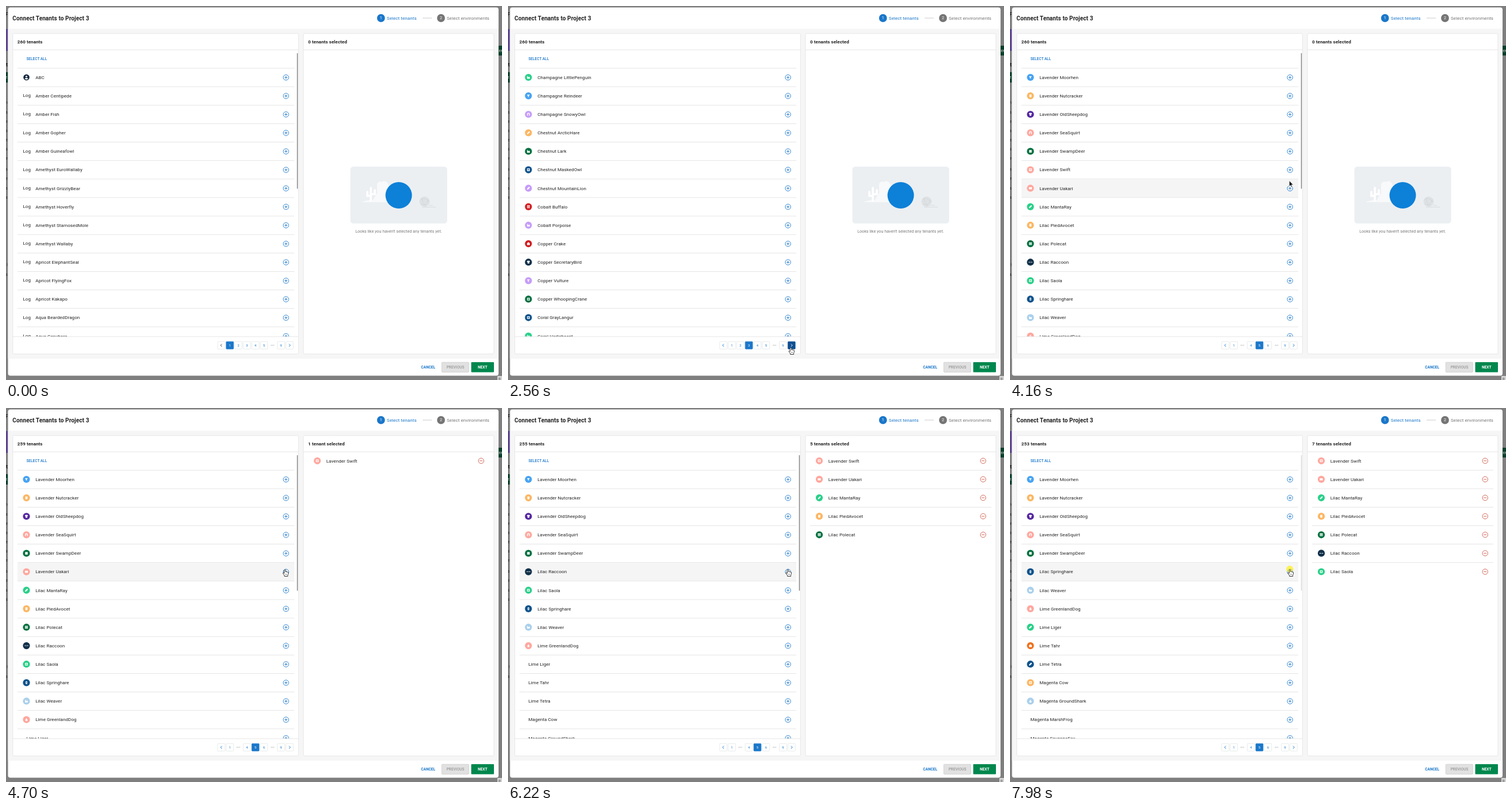
Recreate the animation shown at these times as an HTML page. Size 862 by 650 pixels, loop 8 s.

```html
<!DOCTYPE html>
<html lang="en">
<head>
<meta charset="utf-8">
<title>Connect tenants</title>
<style>
  html, body { margin: 0; width: 100%; height: 100%; overflow: hidden; background: #7f7f7f; }
  svg { display: block; width: 862px; height: 650px; font-family: Roboto, "Open Sans", sans-serif; }
</style>
</head>
<body>
<svg id="stage" viewBox="0 0 862 650"></svg>
<script>
const LOOP = 8000, PITCH = 32.12, STEP = 66.7;
const BLUE = '#1a77ca', INK = '#212121', MUTED = '#757575', LINE = '#dfdfdf';

const COLORS = {
  G: '#2ad089', B: '#47a3f3', V: '#c69cf9', O: '#fcb663', D: '#00703f', N: '#0f538c', R: '#d11d20',
  K: '#12314a', P: '#ffa79e', U: '#5528a0', S: '#aad0ec', T: '#f0701d'
};
const GLYPHS = {
  a: 'M-2.2-2.2h4.4v4.4h-4.4z',
  b: 'M-2.5-2.5h5v1.2h-5zM-2.5-.6h5v1.2h-5zM-2.5 1.3h5v1.2h-5z',
  p: 'M-2.6 2.6L-2 .4L.8-2.4Q2.8-2.8 2.4-.8L-.4 2z',
  f: 'M-2.6-2H2.4L.6.3V2.6L-.8 1.6V.3z',
  h: 'M-2.4 2.4V-.6L0-2.8L2.4-.6V2.4z',
  r: 'M-2.6-1.8h5.2v3.6h-5.2z',
  l: 'M-2.6-2.2h5.2v1.8h-5.2zM-2.6.4h5.2v1.8h-5.2z',
  d: 'M-3-.5h2v1h-2zM-.5-.4h1.2v.8h-1.2zM1.2-.5h2v1h-2z',
  o: 'M-1.4-1.6Q0-3.6 1.4-1.6V1.6Q0 3.6-1.4 1.6zM-.4-1.2V1.2H.4V-1.2z',
  u: 'M-1.8-2.4h3.6v4l-.8 1h-2l-.8-1z',
  w: 'M-2.4 2.4V-2.2h1.2v2L.6-1.2V0L2.4-1.2V2.4z',
  n: 'M-2.4 2.2V-.4Q-2.2-2.8 0-2.8T2.4-.4V2.2H1V-.4Q.8-1.4 0-1.4T-1-.4V2.2z',
  t: 'M0-2.8L2 1Q2 2.6 0 2.6T-2 1z',
  c: 'M-2.8-1.4L-1.2-2.4H1.2L2.8-1.4L2 0 1.5-.3V2.4H-1.5V-.3L-2 0z',
  x: 'M-2.3-2.3h4.6v4.6h-4.6zM-1-1v2h2v-2z'
};

// Each tenant: colour key, glyph key, name. "--" has no picture of its own.
const list = text => text.split(',').map(s => {
  const entry = s.trim();
  return { color: entry[0], glyph: entry[1], name: entry.slice(3) };
});
const PAGES = {
  1: list(`-- ABC,-- Amber Centipede,-- Amber Fish,-- Amber Gopher,-- Amber Guineafowl,-- Amethyst EuroWallaby,
    -- Amethyst GrizzlyBear,-- Amethyst Hoverfly,-- Amethyst StarnosedMole,-- Amethyst Wallaby,
    -- Apricot ElephantSeal,-- Apricot FlyingFox,-- Apricot Kakapo,-- Aqua BeardedDragon,-- Aqua Capybara`),
  2: list(`Vw Azure Bison,Gp Azure Heron,Nx Azure Marmot,Pr Beige Cuckoo,Ou Beige Lemur,Da Beige SandCat,
    Bf Black Gecko,Rb Black Otter,Kc Blue Dormouse,Vn Blue Macaw,Sw Bronze Alpaca,Gx Bronze Puffin,
    No Bronze Tapir,Th Brown Ibis,Pt Carmine Newt`),
  3: list(`Gw Champagne LittlePenguin,Bf Champagne Reindeer,Vn Champagne SnowyOwl,Op Chestnut ArcticHare,
    Dw Chestnut Lark,Nx Chestnut MaskedOwl,Vp Chestnut MountainLion,Rb Cobalt Buffalo,Vw Cobalt Porpoise,
    Rh Copper Crake,Kc Copper SecretaryBird,Vf Copper Vulture,Dx Copper WhoopingCrane,Nx Coral GrayLangur,
    Gw Coral Hartebeest`),
  4: list(`Dl Cyan Badger,Pa Cyan Jackal,Ou Emerald Finch,Bf Emerald Llama,Vn Fuchsia Stoat,Kd Gold Beaver,
    Gp Gold Kestrel,Rh Gray Ocelot,Sw Green Toucan,No Indigo Camel,Tt Indigo RedPanda,Ux Ivory Gibbon,
    Db Ivory Pelican,Pr Jade Mongoose,Vw Jade Walrus`),
  5: list(`Bf Lavender Moorhen,Ou Lavender Nutcracker,Uc Lavender OldSheepdog,Pn Lavender SeaSquirt,
    Da Lavender SwampDeer,Px Lavender Swift,Pr Lavender Uakari,Gp Lilac MantaRay,Ou Lilac PiedAvocet,
    Dl Lilac Polecat,Kd Lilac Raccoon,Gx Lilac Saola,No Lilac Springhare,Sw Lilac Weaver,
    Pt Lime GreenlandDog,Gp Lime Liger,Th Lime Tahr,Np Lime Tetra,Ox Magenta Cow,St Magenta GroundShark,
    Gp Magenta MarshFrog,Bh Magenta SavannaFox`)
};
const PAGE_TIMES = [1440, 2100, 2630, 3160];
const LOADED_AT = { 3: 2300, 4: 2830, 5: 3290 };
const SELECT_TIMES = [4570, 5220, 5690, 5960, 6220, 7500, 7780];
const PRESSES = [[1240, 1310], [1970, 2040], [2500, 2560], [3090, 3160], [4430, 4500], [5080, 5150],
  [5550, 5620], [5830, 5890], [6050, 6150], [7290, 7430], [7640, 7710], [7980, 8000]];

const clamp = u => Math.max(0, Math.min(1, u));
const easeOut = u => 1 - (1 - u) ** 3;
const easeInOut = u => u * u * (3 - 2 * u);
const MOVES = [[70, 1110, 491.5, 593.5, easeOut], [3560, 4360, 484.7, 280.5, easeInOut], [4850, 5010, 486.5, 280.5, easeInOut]];

const rect = (x, y, w, h, fill, rx = 0, extra = '') =>
  `<rect x="${x}" y="${y}" width="${w}" height="${h}" rx="${rx}" fill="${fill}" ${extra}/>`;
const circle = (x, y, r, fill, extra = '') => `<circle cx="${x}" cy="${y}" r="${r}" fill="${fill}" ${extra}/>`;
const path = (d, fill, extra = '') => `<path d="${d}" fill="${fill}" fill-rule="evenodd" ${extra}/>`;
const stroke = (d, color, width) => path(d, 'none', `stroke="${color}" stroke-width="${width}"`);
const at = (x, y, body) => `<g transform="translate(${x} ${y})">${body}</g>`;
const text = (x, y, str, size = 8.03, fill = INK, weight = 400, anchor = 'start', spacing = '.0094em') =>
  `<text x="${x}" y="${y + size * .355}" font-size="${size}" fill="${fill}" font-weight="${weight}" ` +
  `text-anchor="${anchor}" letter-spacing="${spacing}">${str}</text>`;
const hline = (x1, x2, y) => rect(x1, y - .3, x2 - x1, .8, LINE);
const panel = (x, w) => rect(x, 47.8, w, 557, '#fff', 2, `stroke="${LINE}" stroke-width=".7"`) + hline(x, x + w, 76);
const sign = (x, y, color, plus) => circle(x, y, 4.7, 'none', `stroke="${color}" stroke-width=".9"`) +
  stroke(`M${x - 2.5} ${y}h5` + (plus ? `M${x} ${y - 2.5}v5` : ''), color, .9);
const avatar = (x, y, item) => at(x, y, circle(0, 0, 6.1, COLORS[item.color]) + path(GLYPHS[item.glyph], '#fff'));

function backdrop() {
  const letters = [[168, 'n'], [185, 's'], [201, 'e'], [217, 's'], [233, 'e'], [249, 's'], [265, 'e'],
    [284, 's'], [300, 'e'], [317, 's'], [333, 's'], [450, 'l'], [467, 's']];
  return rect(0, 0, 862, 650, '#7f7f7f') +
    text(-1.5, 15, 'F', 9, '#222', 700) + rect(0, 40, 4, 38, '#5d4590') + text(0, 102, 't', 9, '#222', 700) +
    rect(0, 115, 4, 18, '#063f2a') + text(-1, 124, 'E', 6, '#aaa', 700) +
    letters.map(([y, s]) => text(3, y, s, 7, '#333', 400, 'end')).join('') +
    rect(856, 69, 6, 17, '#063f2a') + text(856.5, 77.5, 'EN', 6, '#aaa', 700) +
    rect(854, 643, 8, 7, '#d5d5d5') + text(856, 648, 'R', 6, '#444');
}

function frame() {
  return rect(3.5, 2.5, 852.5, 640, '#fff', 4) + rect(3.5, 39.5, 852.5, 573.5, '#f6f6f6') +
    text(11.3, 21, 'Connect Tenants to Project 3', 10.04, INK, 700) +
    circle(651.7, 21, 6.9, BLUE) + text(651.7, 21, '1', 7, '#fff', 400, 'middle') +
    text(661.8, 21, 'Select tenants', 8.03, BLUE) + rect(724, 20.6, 16, .8, '#bdbdbd') +
    circle(756, 21, 6.9, MUTED) + text(756, 21, '2', 7, '#fff', 400, 'middle') +
    text(766, 21, 'Select environments', 8.03, MUTED) +
    panel(11.8, 496.6) + panel(517, 331) +
    text(35.4, 91.8, 'SELECT ALL', 6.53, BLUE, 500, 'start', 0) + hline(20, 501, 108) +
    text(733.6, 628, 'CANCEL', 6.53, BLUE, 700, 'middle', 0) +
    rect(757.3, 619.2, 47, 17.2, '#e1e1e1', 1, 'stroke="#c8c8c8" stroke-width=".7"') +
    text(781, 628, 'PREVIOUS', 6.53, '#999', 500, 'middle', 0) +
    rect(808.5, 619, 39.5, 17.6, '#00874d', 1) + text(828.2, 628, 'NEXT', 6.53, '#fff', 700, 'middle', 0);
}

function emptyState() {
  return rect(598.5, 279.3, 168.2, 98.6, '#ebeff2', 5) +
    path('M618 341Q628 336 637 338L645 325V309Q649 303 653 306Q658 302 663 307L667 316L676 321V341z', '#f8f9fa') +
    `<g fill="none" stroke="#fff" stroke-width="3.6" stroke-linecap="round"><path d="M634 338V316M634 330H628V323M634 327H641V320"/></g>` +
    circle(727.5, 340, 9, '#dfe2e4') +
    stroke('M720 337Q728 330 735 341M721 344Q730 350 734 336M724 334Q722 342 730 347', '#cfd3d6', .7) +
    stroke('M723 349.5h24M735 346.5h7', '#d4d7da', .8) +
    circle(682.5, 329, 23, '#0d80d8') +
    text(682.3, 391.5, "Looks like you haven't selected any tenants yet.", 7.03, MUTED, 400, 'middle', '.0107em');
}

function tenantRow(item, i, page, t, hovered) {
  const y = 124 + PITCH * i;
  const index = PAGES[page].indexOf(item);
  const waiting = page > 2 && t < LOADED_AT[page] && (page < 5 || index < 8);
  const missing = page === 5 && index >= (t < 6950 ? 15 : 20);
  let icon = '';
  if (item.name === 'ABC') {
    icon = circle(35.5, y, 5.3, '#12263f') + circle(35.5, y - 1.5, 1.6, '#fff') +
      path(`M32.4 ${y + 2.3}Q35.5 ${y - .4} 38.6 ${y + 2.3}Q35.5 ${y + 5.3} 32.4 ${y + 2.3}z`, '#fff');
  } else if (page === 1) icon = text(29.4, y - .7, 'Log');
  else if (waiting) icon = `<g clip-path="url(#tiny)">${text(31.6, y + 1.2, 'Lo')}</g>`;
  else if (!missing) icon = avatar(35.5, y, item);
  return (hovered ? rect(20, y - 15.6, 481, 31.5, '#f5f5f5') : '') + icon +
    text(missing ? 35.4 : 51.2, y, item.name) + sign(486.6, y + .2, BLUE, true) + hline(20, 501, y + 16.1);
}

function selectedRow(item, i, count) {
  const y = 91.8 + PITCH * i;
  return avatar(541, y, item) + text(556.7, y, item.name) + sign(825.7, y, '#cb5847', false) +
    (i < count - 1 ? hline(525, 840, y + 16.2) : '');
}

function pagination(page, hover) {
  const labels = ['<', 1, ...(page < 5 ? [2, 3, 4] : ['···', 4, 5]), page < 5 ? 5 : 6, '···', 9, '>'];
  return labels.map((label, i) => {
    const x = 374.2 + 14.83 * i, y = 589.7;
    if (label === '···') return text(x, y, label, 7, MUTED, 700, 'middle');
    const current = label === page, hot = label === '>' && hover;
    const fill = current ? BLUE : hot ? '#0d4f92' : '#fff';
    const ink = current || hot ? '#fff' : label === '<' && page === 1 ? '#444' : BLUE;
    const box = rect(x - 6.4, y - 6.5, 12.8, 13, fill, 1, `stroke="${current || hot ? fill : '#d9dde0'}" stroke-width=".6"`);
    const dir = label === '<' ? 1 : -1;
    return box + (isNaN(label)
      ? stroke(`M${x + dir} ${y - 2.3}l${-2.3 * dir} 2.3l${2.3 * dir} 2.3`, ink, 1)
      : text(x, y, label, 6, ink, 400, 'middle', 0));
  }).join('');
}

function cursorAt(t) {
  let x = 866, y = 650;
  for (const [start, end, toX, toY, ease] of MOVES) {
    if (t < start) break;
    const stepped = (Math.floor((t - start) / STEP) + 1) * STEP;
    const p = ease(clamp(stepped / (end - start)));
    x += (toX - x) * p;
    y += (toY - y) * p;
  }
  return { x, y };
}

function pointer({ x, y }, hand) {
  return at(x, y, hand
    ? path('M-1.2 1V7L-2.4 5.8Q-3.6 5.6-3.4 7L-.8 10.5V12H5V10Q6.2 8 6 5.5Q5.6 4.3 4.6 4.8Q4 3.9 3 4.4Q2.2 3.6 1.2 4.2V1Q0-.6-1.2 1z',
      '#fff', 'stroke="#222" stroke-width=".9" stroke-linejoin="round"') + stroke('M1.2 7.5v2.3M2.8 7.5v2.3', '#222', .5)
    : path('M0 0V10L2.4 7.8L4 11.4L5.6 10.7L4 7.3H7.2z', '#111', 'stroke="#fff" stroke-width=".8"'));
}

function scrollbar(t) {
  if (t < 1000) return 1 - clamp((t - 780) / 200);
  return t < 3690 ? 0 : 1 - clamp((t - 7800) / 260);
}

const STATIC = `<defs><clipPath id="rows"><rect x="12" y="76" width="496" height="498.5"/></clipPath>
  <clipPath id="tiny"><rect x="29" y="80" width="10.6" height="500"/></clipPath></defs>` + backdrop() + frame();

function scene(t) {
  const page = 1 + PAGE_TIMES.filter(time => t >= time).length;
  const count = SELECT_TIMES.filter(time => t >= time).length;
  const selected = PAGES[5].slice(5, 5 + count);
  const rows = PAGES[page].filter(item => !selected.includes(item)).slice(0, 15);
  const tip = cursorAt(t);
  const overList = tip.x > 20 && tip.x < 501 && tip.y > 108 && tip.y < 574;
  const hoverRow = overList ? Math.floor((tip.y - 108) / PITCH) : -1;
  const onNext = tip.x > 486.4 && tip.x < 499.4 && tip.y > 583 && tip.y < 596.5;
  const onPlus = overList && Math.hypot(tip.x - 486.6, tip.y - 124 - hoverRow * PITCH) < 7;
  const pressed = PRESSES.some(([on, off]) => t >= on && t < off);

  return STATIC +
    text(19.8, 61.8, `${260 - count} tenants`, 8.03, INK, 700) +
    text(525, 61.8, `${count} tenant${count === 1 ? '' : 's'} selected`, 8.03, INK, 700) +
    `<g clip-path="url(#rows)">${rows.map((item, i) => tenantRow(item, i, page, t, i === hoverRow)).join('')}</g>` +
    hline(12, 508, 574.7) + pagination(page, onNext) +
    rect(505.8, 82, 1.3, 235.5, '#777', .6, `opacity="${scrollbar(t).toFixed(2)}"`) +
    (count ? selected.map((item, i) => selectedRow(item, i, count)).join('') : emptyState()) +
    (pressed ? circle(tip.x - .3, tip.y - .4, 6, '#fff000', 'opacity=".65"') : '') +
    pointer(tip, onNext || onPlus);
}

const stage = document.getElementById('stage');
const startTime = performance.now();
let shown = '';
function tick() {
  const markup = scene((performance.now() - startTime) % LOOP);
  if (markup !== shown) stage.innerHTML = shown = markup;
  requestAnimationFrame(tick);
}
tick();
</script>
</body>
</html>
```
